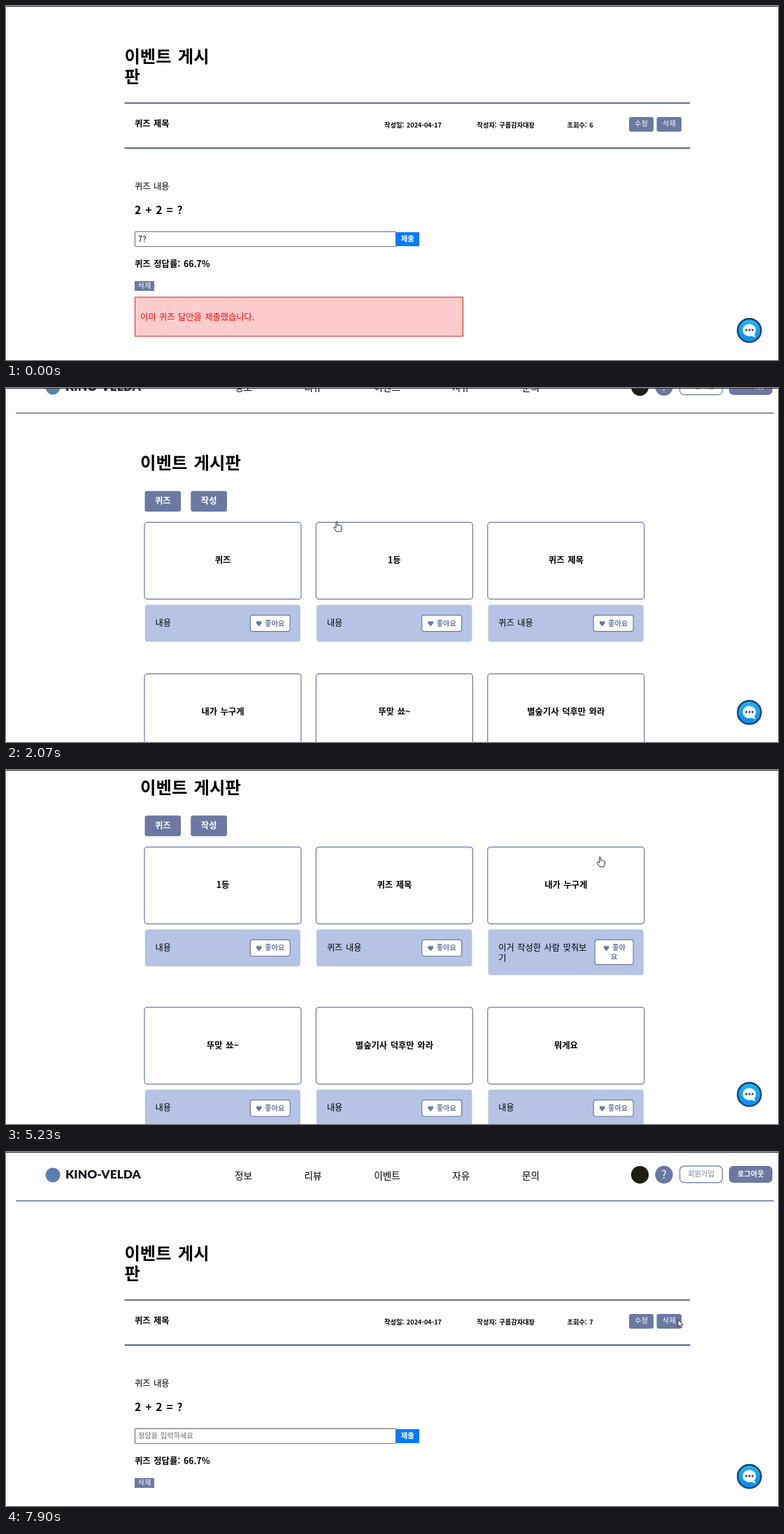
An HTML page for the animation above (8000 ms loop, 1104x507 px).

```html
<!DOCTYPE html>
<html lang="ko">
<head>
<meta charset="utf-8">
<title>이벤트 게시판</title>
<style>
  html, body { margin: 0; width: 100%; height: 100%; overflow: hidden; background: #fefefe; }
  svg { display: block; width: 100vw; height: 100vh; }
  text { font-family: "Noto Sans CJK KR", "Noto Sans CJK", "Noto Sans", sans-serif; word-spacing: .1em; white-space: pre; }
  .brand { font-family: Lato, "Open Sans", sans-serif; }
</style>
</head>
<body>
<svg viewBox="0 0 1104 507">
  <defs>
    <linearGradient id="sky" x2="0" y2="1">
      <stop offset="0" stop-color="#22b4fb"/><stop offset="1" stop-color="#078bee"/>
    </linearGradient>
  </defs>
  <g id="page"></g>
  <rect width="1104" height="1" fill="#333"/>
  <g transform="translate(1063 464.7)">
    <circle r="16.7" fill="url(#sky)" stroke="#1b4165" stroke-width="2.4"/>
    <path d="M0-9.200A9 9 0 1 1 4 7.600L8.800 9.700 7 5.200Z" fill="none"/>
    <path d="M0-9.200C5.400-9.200 9.400-5.400 9.400-.500 9.400 1.900 8.500 3.800 7.200 5.400L9 10 3.400 7.800C-3.400 9.700-9.400 5.500-9.400-.500-9.400-5.400-5.400-9.200 0-9.200Z" fill="#fff"/>
    <path d="M-4.400-.7h0M.1-.7h0M4.600-.7h0" stroke="#1b4165" stroke-width="3" stroke-linecap="round"/>
  </g>
  <path id="cursor" fill="#fff" stroke="#111" stroke-width=".9" stroke-linejoin="round"/>
</svg>
<script>
const SLATE = '#6b78a2', LOGO = '#5b7fae', BRAND = 'KINO-VELDA';
const LOOP = 8000, TICK = LOOP / 81, STAGE_H = 507;
const page = document.getElementById('page');
const cursor = document.getElementById('cursor');

const ARROW = 'M0 0V10.4L2.4 8.3 4 11.8 5.600 11 4.100 7.7H7.2Z';
const HAND = 'M-1 8V1Q0-1 1 1V5.5Q2.2 4.6 3 5.8Q4.3 5 5 6.3Q6.5 5.8 7 7.2V11L5.6 14.8H-.4L-4 9.6Q-4.4 7.6-2.600 8L-1 9.2Z';

// y is the middle of the line of text
const text = (x, y, s, size, { weight = 400, fill = '#000', anchor = 'start', cls = '' } = {}) =>
  `<text class="${cls}" x="${x}" y="${y + size * .37}" font-size="${size}" font-weight="${weight}" fill="${fill}" text-anchor="${anchor}">${s}</text>`;
const bold = (x, y, s, size, style) => text(x, y, s, size, { weight: 700, ...style });
const brand = (x, y, size) => text(x, y, BRAND, size, { weight: 900, fill: '#15181f', cls: 'brand' });
const rect = (x, y, w, h, fill, r = 0, stroke = 'none') =>
  `<rect x="${x}" y="${y}" width="${w}" height="${h}" rx="${r}" fill="${fill}" stroke="${stroke}" stroke-width="1.2"/>`;
const circle = (x, y, r, fill) => `<circle cx="${x}" cy="${y}" r="${r}" fill="${fill}"/>`;
const rule = (x1, x2, y, h) => rect(x1, y - h / 2, x2 - x1, h, SLATE);
const button = (x, y, w, h, label, { size = 10.3, r = 3, fill = SLATE, weight = 500 } = {}) =>
  rect(x, y, w, h, fill, r) + text(x + w / 2, y + h / 2 - 1, label, size, { weight, fill: '#fff', anchor: 'middle' });

function header() {
  let x = 327, menu = '';
  for (const item of ['정보', '리뷰', '이벤트', '자유', '문의']) {
    menu += text(x, 33.5, item, 13.6, { weight: 500 });
    x += item.length * 12.5 + 74.6;
  }
  return circle(67, 33, 10.5, LOGO) + brand(85, 32, 17.4) + menu
    + circle(906.5, 32.7, 12.6, '#1f1d16') + circle(941, 32.5, 12.7, SLATE)
    + text(941, 32.5, '?', 16, { weight: 300, fill: '#fff', anchor: 'middle' })
    + rect(963.6, 20.2, 60.8, 23.6, '#fff', 6, SLATE)
    + text(994, 31, '회원가입', 10.3, { fill: SLATE, anchor: 'middle' })
    + button(1034, 20, 62, 24, '로그아웃', { r: 6, weight: 700 })
    + rule(14, 1098, 70, 1.6);
}

function footer(y) {
  const column = (x, title, lines) => text(x, y + 21, title, 12.4, { weight: 500, fill: SLATE })
    + lines.map((s, i) => text(x, y + 45 + i * 15.1, s, 8, { fill: '#111' })).join('');
  return rule(14, 1091, y, 1.6) + circle(53.5, y + 36, 15.5, LOGO) + brand(81, y + 34.5, 25.8)
    + column(443, 'Resources', ['서비스 소개', '서비스 이용 약관', '개인정보처리 방침',
      'Copyright @2024 모루누비스튜디오 ALL RIGHTS RESERVED'])
    + column(866, 'Company', ['사업자명: ' + BRAND, '사업자등록번호: 000-00-00000',
      '소재지: 가온시 나래구 다솜동', '전화번호: 00-000-0000']);
}

const EMPTY = { title: '', date: '', author: 'Unknown', views: '', shift: 0 };
const DAY = { title: '퀴즈', date: '2024-04-18', author: '하람돌', views: 3, shift: 0,
  body: '내용', question: '오늘 무슨 요일', rate: '0%' };
const SUM = { title: '퀴즈 제목', date: '2024-04-17', author: '구름감자대장', views: 7, shift: 4.5,
  body: '퀴즈 내용', question: '2 + 2 = ?', rate: '66.7%' };
const SUM_DONE = { ...SUM, views: 6, answer: '7?', error: '이미 퀴즈 답안을 제출했습니다.' };

const smallDelete = y => button(184, y - 7, 28, 14, '삭제', { r: 0 });

function quizBody(quiz, d) {
  const { answer, error } = quiz;
  return text(184, 326.5 + d, quiz.body, 12.2, { weight: 500 })
    + bold(184, 361 + d, quiz.question, 15.6)
    + rect(184.5, 391.7 + d, 373, 21.3, '#fff', 1.5, '#767676')
    + text(189, 402 + d, answer || '정답을 입력하세요', answer ? 11.2 : 10.2, { fill: answer ? '#000' : '#666' })
    + button(557.5, 392.5 + d, 33.5, 20, '제출', { r: 0, fill: '#007bff', weight: 700 })
    + bold(184, 437.5 + d, '퀴즈 정답률: ' + quiz.rate, 12.3)
    + smallDelete(469.5 + d)
    + (error ? rect(184.5, 485.5 + d, 469, 56, '#fcc', 0, '#e23a3a') + text(192, 513.5 + d, error, 12.2, { fill: '#f00' }) : '');
}

const footerTop = quiz => quiz.body ? 566 + quiz.shift + (quiz.error ? 70 : 0) : 468;

function detail(quiz) {
  const d = quiz.shift;
  return bold(169.5, 145, '이벤트 게시', 24.3) + bold(169.5, 174.5, '판', 24.3)
    + rule(169.5, 978, 212, 2.4) + rule(169.5, 978.5, 275 + d / 3, 2.6)
    + bold(184, 238 + d * .67, quiz.title, 12.2)
    + bold(541, quiz.date ? 243.7 : 241.5, '작성일: ' + quiz.date, 9.2)
    + bold(673.5, 243.7, '작성자: ' + quiz.author, 9.2)
    + bold(802.5, quiz.date ? 243.7 : 241.5, '조회수: ' + quiz.views, 9.2)
    + button(891, 232, 35, 21, '수정') + button(930.5, 232, 35.5, 21, '삭제')
    + (quiz.body ? quizBody(quiz, d) : bold(184, 337, '퀴즈 결과가 없습니다.', 18.1) + smallDelete(372))
    + footer(footerTop(quiz));
}

const CARDS = [['퀴즈', '내용'], ['1등', '내용'], ['퀴즈 제목', '퀴즈 내용'],
  ['내가 누구게', '이거 작성한 사람 맞춰보', '기'], ['뚜맞 쑈~', '내용'], ['별숲기사 덕후만 와라', '내용'], ['뭐게요', '내용']];
const CARD_X = 198, CARD_Y = 226, CARD_W = 224, CARD_STEP = 245.4;

const heart = (x, y) =>
  `<path transform="translate(${x} ${y})" d="M0 4.2L-3.6 0C-5-2.4-1.7-5 0-2.2C1.7-5 5-2.4 3.6 0Z" fill="${SLATE}"/>`;

function likeButton(right, y, wrapped) {
  const w = wrapped ? 55 : 57, x = right - w, style = { fill: SLATE, weight: 700 };
  return rect(x, y, w, wrapped ? 35.5 : 23.3, '#fff', 3.5, SLATE)
    + heart(x + (wrapped ? 16.5 : 12.5), y + 12)
    + text(x + (wrapped ? 25 : 21), y + 11.5, wrapped ? '좋아' : '좋아요', 10.2, style)
    + (wrapped ? text(x + w / 2, y + 24, '요', 10.2, { ...style, anchor: 'middle' }) : '');
}

function card([title, ...lines], col, y) {
  const x = CARD_X + col * CARD_STEP, wrapped = lines.length > 1;
  return rect(x, y + .5, CARD_W, 110, '#fefefe', 4, SLATE)
    + bold(x + CARD_W / 2, y + 54.7, title, 12.3, { anchor: 'middle' })
    + rect(x + .7, y + 118.5, CARD_W - 1.7, wrapped ? 65.500 : 53, '#b6c3e4', 4)
    + lines.map((s, i) => text(x + 15.5, y + 144.3 + i * 15, s, 12.2, { weight: 500 })).join('')
    + likeButton(x + 208.3, y + 133.4, wrapped);
}

function board(cards) {
  const tab = { size: 12.3, weight: 700 };
  let y = CARD_Y, out = bold(192, 141.5, '이벤트 게시판', 24.4)
    + button(198.5, 181.5, 51.5, 29.5, '퀴즈', tab) + button(264.3, 181.5, 51.7, 29.5, '작성', tab);
  for (let i = 0; i < cards.length; i += 3) {
    const row = cards.slice(i, i + 3);
    out += row.map((c, col) => card(c, col, y)).join('');
    y += row.some(c => c.length > 2) ? 229.5 : 217;
  }
  return out;
}

const quizView = (at, quiz) => ({ at, draw: () => detail(quiz), maxScroll: footerTop(quiz) + 122 - STAGE_H });
const boardView = (at, cards) => ({ at, draw: () => board(cards), maxScroll: 500, isBoard: true });
const VIEWS = [quizView(0, SUM_DONE), boardView(1660, CARDS), quizView(2550, EMPTY), quizView(2850, DAY),
  boardView(5020, CARDS.slice(1)), quizView(6790, EMPTY), quizView(7190, SUM)];

// Each move eases the named values to a goal between two times
const move = (start, end, goal) => ({ start, end, goal });
const MOVES = [
  move(420, 1080, { scroll: 0 }),
  move(480, 1280, { x: 250, y: 182 }),
  move(1290, 1480, { x: 245, y: 138 }),
  move(1660, 2070, { x: 473, y: 191 }),
  move(1897, 2470, { scroll: 150 }),
  move(2080, 2470, { x: 342, y: 138 }),
  move(2550, 2560, { scroll: 83 }),
  move(2860, 3460, { scroll: 145 }),
  move(2860, 3550, { x: 980, y: 148 }),
  move(4060, 4540, { x: 960, y: 98 }),
  move(5040, 5720, { scroll: 0 }),
  move(5040, 5820, { x: 249, y: 264 }),
  move(5830, 5920, { x: 300, y: 265 }),
  move(6130, 6220, { x: 389.5, y: 272.5 }),
  move(6230, 6420, { x: 763, y: 304 }),
  move(6430, 6600, { x: 630, y: 298 }),
  move(7110, 7500, { x: 957, y: 260 }),
  move(7710, 7890, { x: 961, y: 240 })
];

function poseAt(t) {
  const pose = { x: 575, y: 335, scroll: 73 };
  for (const { start, end, goal } of MOVES) {
    const u = Math.min(1, Math.max(0, (t - start) / (end - start)));
    for (const key in goal) pose[key] += (goal[key] - pose[key]) * u * u * (3 - 2 * u);
  }
  return pose;
}

function overLink(view, x, y) {
  if (view.isBoard) return y > CARD_Y - 2 && x > CARD_X && (x - CARD_X) % CARD_STEP < CARD_W;
  return x > 169 && x < 290 && y > 128 && y < 190;
}

let shownView = null;
function render(time) {
  const t = Math.floor(time / TICK + .2) * TICK;
  const view = VIEWS.filter(v => v.at <= t).pop();
  if (view !== shownView) {
    page.innerHTML = header() + view.draw();
    shownView = view;
  }
  const { x, y, scroll } = poseAt(t);
  const top = Math.min(scroll, view.maxScroll);
  page.setAttribute('transform', `translate(0 ${-top})`);
  cursor.setAttribute('d', overLink(view, x, y + top) ? HAND : ARROW);
  cursor.setAttribute('transform', `translate(${x} ${y})`);
  cursor.setAttribute('visibility', t < 550 ? 'hidden' : 'visible');
}

const begin = performance.now();
function tick() {
  render((performance.now() - begin) % LOOP);
  requestAnimationFrame(tick);
}
tick();
</script>
</body>
</html>
```
